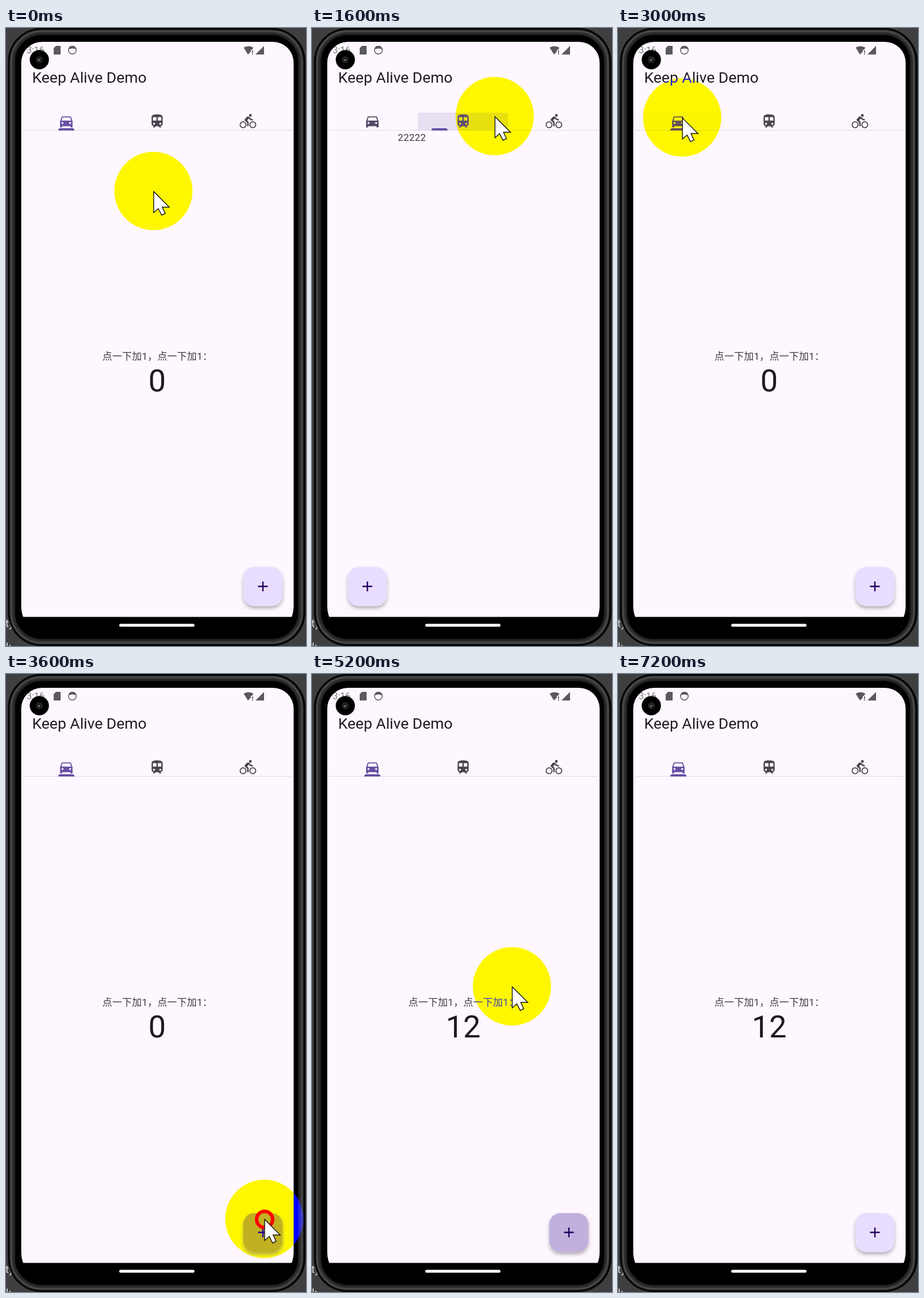
Recreate the animation shown at these times as an HTML page. Size 522 by 1073 pixels, loop 7.27 s.

```html
<!DOCTYPE html>
<html lang="zh-CN">
<head>
<meta charset="utf-8">
<title>Keep Alive Demo</title>
<style>
html, body { margin: 0; width: 100%; height: 100%; overflow: hidden; background: #3f3f41; }
svg { display: block; width: 522px; height: 1073px; isolation: isolate; }
text { font-family: Roboto, "Noto Sans CJK SC", sans-serif; fill: #1d1b20; }
.body { font-size: 16.9px; letter-spacing: .3px; fill: #3a373e; }
#spot { mix-blend-mode: difference; }
</style>
</head>
<body>
<svg viewBox="0 0 522 1073">
  <defs>
    <clipPath id="screen">
      <path d="M26.500 60a36 36 0 0 1 36-36H464.500a36 36 0 0 1 36 36V1004q0 10-3.500 18.500H30q-3.500-8.500-3.500-18.500z"/>
    </clipPath>
    <filter id="shade" x="-30%" y="-30%" width="160%" height="170%">
      <feDropShadow dx="0" dy="4" stdDeviation="3.2" flood-color="#000" flood-opacity=".3"/>
    </filter>
    <filter id="soft"><feGaussianBlur stdDeviation="1.2"/></filter>
  </defs>

  <!-- desk and phone body -->
  <rect width="522" height="1073" fill="#3f3f41"/>
  <text x="-1" y="1040" font-size="18" style="fill:#ddd">ty</text>
  <text x="0" y="1081" font-size="18" style="fill:#ddd">k</text>
  <rect x="3.500" y="0" width="517.500" height="1073" rx="58" fill="#000"/>
  <g fill="none" filter="url(#soft)">
    <rect x="11.500" y="8" width="501" height="1057" rx="50" stroke="#2a2a2a" stroke-width="8"/>
    <rect x="8.500" y="5" width="507" height="1063" rx="53" stroke="#5c5c5c" stroke-width="2.500"/>
  </g>

  <g clip-path="url(#screen)">
    <rect x="26" y="24" width="475" height="999" fill="#fef7ff"/>

    <!-- status bar -->
    <text x="36" y="44" font-size="16" style="fill:#7d7a80">3:16</text>
    <g fill="#5b585e">
      <path d="M87 31h8v15H83V35z"/>
      <path d="M421 46l-7.500-12q8.500-5 17 0l-2.500 4h-2v3z"/>
      <path d="M428 39h1.800v4H428zm0 5h1.800v2H428zM449 31v15h-15z"/>
      <circle cx="115.500" cy="38.500" r="6.700" fill="none" stroke="#5b585e" stroke-width="1.500"/>
      <path d="M109 37q6.500-3 13 0l-1-4-3-2h-5l-3 2z"/>
    </g>
    <circle cx="58" cy="55" r="16.700"/>
    <circle cx="58" cy="55" r="5" fill="#1b1b1b" stroke="#303030" stroke-width="1.500"/>
    <path d="M56 57l3-3" stroke="#aaa" stroke-width="1.500"/>

    <text x="45.500" y="95" font-size="26.500">Keep Alive Demo</text>

    <!-- tab bar -->
    <rect x="26" y="177" width="475" height="1.300" fill="#e7e0ec"/>
    <g id="tabs"></g>
    <path id="bar" d="M91 178v-.5a3.500 3.500 0 0 1 3.500-3.500h21a3.500 3.500 0 0 1 3.500 3.500v.5z" fill="#6750a4"/>

    <!-- pages -->
    <g id="page0">
      <text class="body" x="167.700" y="576">点一下加1，点一下加1：</text>
      <text id="count" x="263" y="631" font-size="54" text-anchor="middle">0</text>
      <g id="fab">
        <rect id="fabBox" x="413" y="936" width="68" height="67.500" rx="19" filter="url(#shade)"/>
        <path d="M447 961v17M438.500 969.500h17" stroke="#21005d" stroke-width="2.400"/>
      </g>
    </g>
    <text id="page1" class="body" x="26" y="196">22222</text>
    <text id="page2" class="body" x="26" y="196">33333</text>
  </g>

  <!-- navigation pill -->
  <rect x="197" y="1034.500" width="131" height="5" rx="2.500" fill="#fff"/>

  <!-- pointer: the spot inverts blue only -->
  <g id="spot"><circle cx="-.5" cy="-1" r="68" fill="#00f"/></g>
  <circle id="ring" r="14" fill="none" stroke="#f00" stroke-width="6"/>
  <path id="arrow" d="M0 0V36.500L8 29.500 14 41 20 38 14.800 27H27z" fill="#fff" stroke="#111" stroke-width="1.400"/>
</svg>

<script>
const LOOP = 7270, PAGE_W = 474, SLIDE = 300;
const $ = id => document.getElementById(id);

const icons = [
  'M18.92 6.01C18.72 5.42 18.16 5 17.5 5h-11c-.66 0-1.21.42-1.42 1.01L3 12v8c0 .55.45 1 1 1h1c.55 0 1-.45 1-1v-1h12v1c0 .55.45 1 1 1h1c.55 0 1-.45 1-1v-8zM6.500 16a1.500 1.500 0 1 1 0-3 1.500 1.500 0 0 1 0 3zm11 0a1.500 1.500 0 1 1 0-3 1.500 1.500 0 0 1 0 3zM5 11l1.500-4.500h11L19 11z',
  'M12 2c-4.420 0-8 .5-8 4v9.500A3.500 3.500 0 0 0 7.500 19L6 20.500v.5h2.200l2-2h3.600l2 2H18v-.5L16.500 19a3.500 3.500 0 0 0 3.500-3.500V6c0-3.500-3.580-4-8-4zM7.500 17a1.500 1.500 0 1 1 0-3 1.500 1.500 0 0 1 0 3zM11 11H6V6h5zm5.500 6a1.500 1.500 0 1 1 0-3 1.500 1.500 0 0 1 0 3zM18 11h-5V6h5z',
  'M15.500 5.500a2 2 0 1 0 0-4 2 2 0 0 0 0 4zM5 12a5 5 0 1 0 0 10 5 5 0 0 0 0-10zm0 8.500a3.500 3.500 0 1 1 0-7 3.500 3.500 0 0 1 0 7zm5.800-10l2.400-2.400.8.8c1.300 1.300 3 2.100 5.100 2.100V9c-1.500 0-2.700-.6-3.600-1.500l-1.900-1.900c-.5-.4-1-.6-1.600-.6s-1.100.2-1.400.6L7.800 8.400c-.8.8-.8 2.100 0 2.800L11 14v5h2v-6.200zM19 12a5 5 0 1 0 0 10 5 5 0 0 0 0-10zm0 8.500a3.500 3.500 0 1 1 0-7 3.500 3.500 0 0 1 0 7z'
];
$('tabs').innerHTML = icons.map((d, i) => `
  <rect id="splash${i}" x="${26 + 158 * i}" y="147" width="157" height="30.500" fill="#5a4a90"/>
  <path id="icon${i}" d="${d}" fill-rule="evenodd" transform="translate(${90.500 + 158 * i} 147.500) scale(1.206)"/>`).join('');

// tab taps: time, from page, to page
const taps = [[1468, 0, 1], [2150, 1, 2], [2650, 2, 0], [5849, 0, 1], [6450, 1, 0]];
const FIRST_ADD = 3640, ADD_STEP = 122, ADDS = 12;
const LAST_ADD = FIRST_ADD + (ADDS - 1) * ADD_STEP;

// pointer track: time, x, y
const track = [
  [0, 257, 284], [700, 257, 284], [1300, 245, 165], [1470, 248, 160], [1600, 318, 154],
  [1850, 425, 150], [2190, 425, 150], [2470, 139, 166], [2600, 115, 163], [3020, 112, 156],
  [3400, 450, 947], [5090, 450, 947], [5200, 349, 545], [5400, 232, 185], [5850, 225, 180],
  [5930, 148, 178], [6150, 108, 168], [6600, 106, 152], [LOOP, 106, 152]
];
const HIDE_AT = 7100;

const clamp = v => Math.max(0, Math.min(1, v));
const mix = (a, b, p) => a + (b - a) * p;
const mixRgb = (a, b, p) => `rgb(${a.map((v, i) => Math.round(mix(v, b[i], p)))})`;

// cubic-bezier(.25, .1, .25, 1)
function ease(x) {
  const bez = (u, a, b) => 3 * u * (1 - u) ** 2 * a + 3 * u * u * (1 - u) * b + u ** 3;
  let lo = 0, hi = 1;
  for (let i = 0; i < 24; i++) {
    const mid = (lo + hi) / 2;
    if (bez(mid, .25, .25) < x) lo = mid; else hi = mid;
  }
  return x >= 1 ? 1 : bez(lo, .1, 1);
}

function pointerAt(t) {
  const i = track.findIndex(k => k[0] > t), a = track[i - 1], b = track[i];
  const p = (t - a[0]) / (b[0] - a[0]);
  return [mix(a[1], b[1], p), mix(a[2], b[2], p)];
}

function drawPages(t) {
  const [start, from, to] = taps.filter(k => k[0] <= t).pop() || [-SLIDE, 1, 0];
  const p = ease(clamp((t - start) / SLIDE)), dir = Math.sign(to - from);
  const offset = { [from]: -dir * p * PAGE_W, [to]: dir * (1 - p) * PAGE_W };
  const pos = mix(from, to, p);
  $('bar').setAttribute('transform', `translate(${158 * pos})`);
  for (let i = 0; i < 3; i++) {
    const page = $('page' + i), x = offset[i];
    page.style.display = x === undefined || Math.abs(x) >= PAGE_W ? 'none' : '';
    page.setAttribute('transform', `translate(${x || 0})`);
    const active = i === from ? 1 - p : i === to ? p : 0;
    $('icon' + i).style.fill = mixRgb([73, 69, 79], [103, 80, 164], active);
    const glow = Math.max(0, ...taps.filter(k => k[2] === i).map(k =>
      Math.min(clamp((t - k[0] + 80) / 100), clamp((370 - t + k[0]) / 220))));
    $('splash' + i).style.opacity = .13 * glow;
  }
}

function drawCounter(t) {
  const n = Math.floor((t - FIRST_ADD) / ADD_STEP) + 1;
  $('count').textContent = Math.max(0, Math.min(ADDS, n));
  const press = Math.min(clamp((t - 3520) / 70), clamp((5450 - t) / 230));
  $('fabBox').style.fill = mixRgb([232, 221, 255], [193, 176, 221], press);
}

function drawPointer(t) {
  const [x, y] = pointerAt(t);
  const adding = t > FIRST_ADD - 70 && t < LAST_ADD && (t - FIRST_ADD + 70 + ADD_STEP) % ADD_STEP < 70;
  const tapping = taps.some(k => t > k[0] - 80 && t < k[0]);
  const shown = { spot: t < HIDE_AT, arrow: t < HIDE_AT, ring: adding || tapping };
  for (const id in shown) {
    $(id).setAttribute('transform', `translate(${x} ${y})`);
    $(id).style.display = shown[id] ? '' : 'none';
  }
}

const begin = performance.now();
function frame() {
  const t = (performance.now() - begin) % LOOP;
  drawPages(t);
  drawCounter(t);
  drawPointer(t);
  requestAnimationFrame(frame);
}
frame();
</script>
</body>
</html>
```
